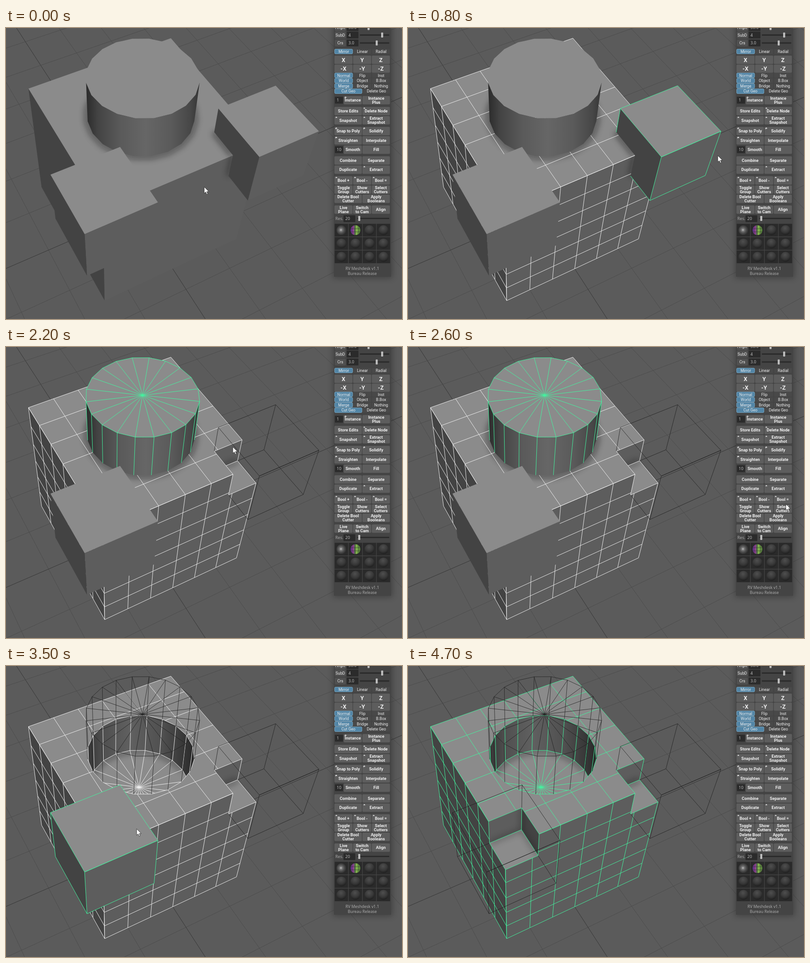
Recreate the animation shown at these times as an HTML page. Size 873x641 px, loop 5000 ms.

```html
<!DOCTYPE html>
<html lang="en">
<head>
<meta charset="utf-8">
<title>Boolean modelling</title>
<style>
html, body { margin: 0; width: 100%; height: 100%; overflow: hidden; background: #5b5b5b; }
svg { display: block; width: 873px; height: 641px; }
text { font-family: Roboto, Arial, sans-serif; }
.plain { font-family: "Noto Sans", "Open Sans", sans-serif; }
</style>
</head>
<body>
<svg viewBox="0 0 873 641">
  <defs>
    <linearGradient id="outside" gradientUnits="userSpaceOnUse" x1="177" x2="428" y1="0" y2="0">
      <stop offset="0" stop-color="#2b2b2b"/><stop offset=".1" stop-color="#434343"/>
      <stop offset=".3" stop-color="#5a5a5a"/><stop offset=".52" stop-color="#666"/>
      <stop offset=".75" stop-color="#5a5a5a"/><stop offset=".92" stop-color="#464646"/><stop offset="1" stop-color="#333"/>
    </linearGradient>
    <linearGradient id="inside" gradientUnits="userSpaceOnUse" x1="180" x2="415" y1="0" y2="0">
      <stop offset="0" stop-color="#363636"/><stop offset=".15" stop-color="#505050"/>
      <stop offset=".4" stop-color="#606060"/><stop offset=".7" stop-color="#505050"/>
      <stop offset=".88" stop-color="#3a3a3a"/><stop offset="1" stop-color="#292929"/>
    </linearGradient>
    <radialGradient id="ball" cx=".45" cy=".3" r=".7">
      <stop offset="0" stop-color="#4f4f4f"/><stop offset=".6" stop-color="#383838"/><stop offset="1" stop-color="#1f1f1f"/>
    </radialGradient>
    <radialGradient id="shiny" cx=".45" cy=".48" r=".55">
      <stop offset="0" stop-color="#c4c4c4"/><stop offset=".25" stop-color="#7a7a7a"/>
      <stop offset=".55" stop-color="#525252"/><stop offset="1" stop-color="#2c2c2c"/>
    </radialGradient>
    <linearGradient id="rainbow">
      <stop offset="0" stop-color="#4b2f80"/><stop offset=".28" stop-color="#a83fa8"/>
      <stop offset=".4" stop-color="#4a5a50"/><stop offset=".55" stop-color="#86b84e"/><stop offset="1" stop-color="#55853a"/>
    </linearGradient>
    <filter id="soft" filterUnits="userSpaceOnUse" x="0" y="0" width="873" height="641"><feGaussianBlur stdDeviation="7"/></filter>
  </defs>
  <rect width="873" height="641" fill="#5b5b5b"/>
  <g id="ground"></g>
  <g id="scene"></g>
  <g id="panel"></g>
  <path id="cursor" d="M0 0V14.2L3.3 11.2L5.6 16.4L7.9 15.4L5.7 10.4H10.2Z" fill="#fff" stroke="#222" stroke-width=".8"/>
</svg>
<script>
const $ = id => document.getElementById(id);
const GREEN = '#43f5a0', WHITE = '#f2f2f2', BLACK = '#202020';
const TOP = '#8b8b8b', FRONT = '#5d5d5d', LEFT = '#434343';

// Perspective view of a unit cube: x to the right, y to the back, z down.
function project([x, y, z]) {
  const w = 1 + .0821 * x + .164 * y + .217 * z;
  return [(213.5 + 395.3 * x - 156.5 * y + 50.6 * z) / w + .5,
          (401.6 - 127.4 * x - 246.8 * y + 328.6 * z) / w + .5].map(v => v.toFixed(1)).join(' ');
}
const line = pts => 'M' + pts.map(project).join('L');
const loop = pts => line(pts) + 'Z';
const fill = (d, color) => `<path d="${d}" fill="${color}"/>`;
const stroke = (d, color, width = .95) => color
  ? `<path d="${d}" fill="none" stroke="${color}" stroke-width="${width}" stroke-linejoin="round"/>` : '';
const clipped = (id, d, body) => `<clipPath id="${id}"><path d="${d}"/></clipPath><g clip-path="url(#${id})">${body}</g>`;
const shade = (d, width, opacity) => `<path d="${d}" fill="none" stroke="#111" stroke-width="${width}" opacity="${opacity}" filter="url(#soft)"/>`;

const range = (a, b) => Array.from({ length: b - a + 1 }, (_, i) => a + i);

// Cutter boxes; the extra fields say where edges disappear into the cube.
const rightBox = { x0: .8086, x1: 1.193, y0: -.1935, y1: .1907, z0: -.198, z1: .188,
  leftDrop: 0, leftRun: 0, farDrop: .188, farRun: .1907, back: [1, 1.193] };
const frontBox = { x0: -.197, x1: .202, y0: -.2, y1: .197, z0: -.195, z1: .202,
  leftDrop: .202, leftRun: .197, farDrop: 0, farRun: 0, back: [-.197, 0] };

const boxTop = b => loop([[b.x0, b.y0, b.z0], [b.x1, b.y0, b.z0], [b.x1, b.y1, b.z0], [b.x0, b.y1, b.z0]]);
const boxFront = b => loop([[b.x0, b.y0, b.z0], [b.x1, b.y0, b.z0], [b.x1, b.y0, b.z1], [b.x0, b.y0, b.z1]]);
const boxLeft = b => loop([[b.x0, b.y0, b.z0], [b.x0, b.y1, b.z0], [b.x0, b.y1, b.leftDrop],
  [b.x0, b.leftRun, b.leftDrop], [b.x0, b.leftRun, b.z1], [b.x0, b.y0, b.z1]]);

const seenEdges = b => boxTop(b) + boxFront(b) +
  line([[b.x0, b.y1, b.z0], [b.x0, b.y1, b.leftDrop]]) +
  line([[b.x0, b.y0, b.z1], [b.x0, b.leftRun, b.z1]]);
const hiddenEdges = b =>
  line([[b.x1, b.y1, b.z0], [b.x1, b.y1, b.farDrop]]) +
  line([[b.x1, b.y0, b.z1], [b.x1, b.farRun, b.z1]]) +
  line(b.back.map(x => [x, b.y1, b.z1]));

const solidBox = (b, wire) =>
  fill(boxFront(b), FRONT) + fill(boxLeft(b), LEFT) + fill(boxTop(b), TOP) + stroke(seenEdges(b), wire);
const ghostBox = b => stroke(seenEdges(b) + hiddenEdges(b), BLACK, .8);

// Cylinder with twenty sides
const DEPTH = .313;
const rim = (i, z) => [.5 + .313 * Math.cos(i * Math.PI / 10), .5 + .313 * Math.sin(i * Math.PI / 10), z];
const ring = z => loop(range(0, 19).map(i => rim(i, z)));
const fan = z => range(0, 19).map(i => line([[.5, .5, z], rim(i, z)])).join('');
const ribs = (from, to, z0, z1) => range(from, to).map(i => line([rim(i, z0), rim(i, z1)])).join('');

function solidCylinder(wire) {
  const side = loop([...range(9, 18).map(i => rim(i, -DEPTH)), ...range(9, 18).reverse().map(i => rim(i, 0))]);
  return fill(side, 'url(#outside)') + fill(ring(-DEPTH), TOP) +
    stroke(ring(-DEPTH) + fan(-DEPTH) + ribs(9, 18, -DEPTH, 0), wire);
}
const ghostCylinder = () => stroke(ring(-DEPTH) + fan(-DEPTH) + ribs(0, 19, -DEPTH, 0), BLACK, .8);

function hole(wire) {
  const floor = ring(DEPTH);
  const body = `<rect x="170" y="100" width="260" height="190" fill="url(#inside)"/>` + fill(floor, TOP) +
    clipped('floor', floor, shade(line(range(0, 10).map(i => rim(i, DEPTH))), 14, .32)) +
    stroke(floor + fan(DEPTH) + ribs(0, 19, 0, DEPTH), wire);
  return clipped('rim', ring(0), body) + stroke(ring(0), wire);
}

// One cube side: outline in its own two axes, six by six grid
function face(id, outline, color, wire, shadow = '') {
  const place = { left: ([y, z]) => [0, y, z], front: ([x, z]) => [x, 0, z], top: ([x, y]) => [x, y, 0] }[id];
  const edge = loop(outline.map(place));
  const grid = range(1, 5).map(k => line([place([k / 6, 0]), place([k / 6, 1])]) + line([place([0, k / 6]), place([1, k / 6])])).join('');
  return { edge, body: fill(edge, color) + clipped(id, edge, shadow + stroke(grid, wire)) };
}

function rightNotch(wire) {
  const { x0, y1, z1 } = rightBox;
  const floor = loop([[x0, 0, z1], [1, 0, z1], [1, y1, z1], [x0, y1, z1]]);
  const wall = loop([[x0, y1, 0], [1, y1, 0], [1, y1, z1], [x0, y1, z1]]);
  const seam = line([[x0, y1, z1], [1, y1, z1]]);
  return fill(floor, TOP) + fill(wall, FRONT) + clipped('nook', floor + wall, shade(seam, 12, .3)) +
    stroke(seam + line([[1, y1, 0], [1, y1, z1], [1, 0, z1]]), wire);
}

function frontNotch(wire) {
  const { x1, y1, z1 } = frontBox;
  const floor = loop([[0, 0, z1], [x1, 0, z1], [x1, y1, z1], [0, y1, z1]]);
  const back = loop([[0, y1, 0], [x1, y1, 0], [x1, y1, z1], [0, y1, z1]]);
  const side = loop([[x1, 0, 0], [x1, y1, 0], [x1, y1, z1], [x1, 0, z1]]);
  const corner = line([[0, y1, z1], [x1, y1, z1], [x1, 0, z1]]) + line([[x1, y1, 0], [x1, y1, z1]]);
  return fill(floor, TOP) + fill(back, FRONT) + fill(side, LEFT) +
    clipped('step', floor + back + side, shade(corner, 8, .28)) + stroke(corner, wire);
}

function drawScene({ cuts, cube, picked }) {
  const r = rightBox, f = frontBox;
  const cutRight = cuts > 0, cutHole = cuts > 1, cutFront = cuts > 2;
  const nearEdge = (a, b) => cutFront ? [[0, b], [a, b], [a, 0]] : [[0, 0]];
  const farEdge = b => cutRight ? [[r.x0, 0], [r.x0, b], [1, b]] : [[1, 0]];
  const shadow = (cutHole ? '' : shade(ring(0), 14, .42)) +
    (cutRight ? '' : shade(line([[r.x0, r.y1, 0], [r.x0, 0, 0]]), 12, .5));
  const frontShadow = cutRight ? '' : shade(line([[r.x0, 0, 0], [r.x0, 0, r.z1]]), 10, .4);
  const faces = [
    face('left', [...nearEdge(f.y1, f.z1), [1, 0], [1, 1], [0, 1]], LEFT, cube),
    face('front', [...nearEdge(f.x1, f.z1), ...farEdge(r.z1), [1, 1], [0, 1]], FRONT, cube, frontShadow),
    face('top', [...nearEdge(f.x1, f.y1), ...farEdge(r.y1), [1, 1], [0, 1]], TOP, cube, shadow)
  ];
  return [
    cutRight ? rightNotch(cube) : '',
    ...faces.map(side => side.body),
    cutFront ? frontNotch(cube) : '',
    stroke(faces.map(side => side.edge).join(''), cube),
    cutHole ? hole(cube) + ghostCylinder() : solidCylinder(picked === 'cylinder' && GREEN),
    cutRight ? ghostBox(r) : solidBox(r, picked === 'right' && GREEN),
    cutFront ? ghostBox(f) : solidBox(f, picked === 'front' && GREEN)
  ].join('');
}

function drawGround() {
  const at = k => .5 + k / 3, lo = at(-9), hi = at(30);
  return range(-9, 30).map(k => {
    const d = line([[at(k), lo, 1], [at(k), hi, 1]]) + line([[lo, at(k), 1], [hi, at(k), 1]]);
    return stroke(d, k ? '#4b4b4b' : '#363636', k ? .9 : 1);
  }).join('');
}

function drawPanel() {
  let out = `<rect x="721" y="-10" width="131" height="561" fill="#000" opacity=".27" filter="url(#soft)"/>
    <rect x="723" y="-5" width="126" height="553" fill="#444"/>`;
  const rect = (x, y, w, h, color, extra = '') => out += `<rect x="${x}" y="${y}" width="${w}" height="${h}" fill="${color}" ${extra}/>`;
  const text = (s, x, y, size, color = '#eee', extra = 'text-anchor="middle"') =>
    out += `<text x="${x}" y="${y}" font-size="${size}" fill="${color}" ${extra}>${s}</text>`;
  const bold = 'text-anchor="middle" font-weight="700"';
  const plain = 'class="plain"', plainMiddle = 'class="plain" text-anchor="middle"';

  // A label may start with ^ (corner caret) or ~ (corner caret with a letter) and use | for a second line.
  function button(label, x, cy, w, h = 18.5, size = 9.2) {
    const mark = /^[\^~]/.test(label) ? label[0] : '';
    const rows = label.slice(mark.length).split('|');
    rect(x, cy - h / 2, w, h, '#5d5d5d', 'rx="2"');
    if (mark) out += `<path d="M${x + 2} ${cy - 5.5}l2.3 -2.5l2.3 2.5z" fill="#eee"/>`;
    if (mark === '~') text('s', x + 3, cy - 4, 6);
    rows.forEach((row, i) => text(row, x + w / 2, cy + size * .36 + (i - (rows.length - 1) / 2) * 8.4, size, '#f0f0f0', bold));
  }
  function row(labels, cy, h, size) {
    const w = 123.5 / labels.length;
    labels.forEach((label, i) => button(label, 724 + i * w, cy, w - 1.2, h, size));
  }
  function tabs(labels, cy) {
    const w = 123.5 / labels.length;
    labels.forEach((label, i) => {
      const on = i === 0;
      rect(724.5 + i * w, cy - 5.2, w - 1.5, 10.4, on ? '#5285a6' : '#494949', `rx="2" ${on ? 'stroke="#86b4d0" stroke-width=".8"' : ''}`);
      text(label, 724 + (i + .5) * w, cy + 3.2, 8.7);
    });
  }
  function field(value, x, cy, w) {
    rect(x, cy - 7.5, w, 15, '#2b2b2b', 'rx="1"');
    text(value, x + 4, cy + 3.4, 9, '#bbb', plain);
  }
  function slider(x, cy, knob) {
    rect(x, cy - 1.5, 845 - x, 3, '#2b2b2b', 'rx="1"');
    rect(knob - 2, cy - 5.5, 4.5, 11, '#bdbdbd', 'rx="1"');
  }

  [['Angle', '30.0', -1, 799], ['SubD', '4', 15.5, 829], ['Crs', '3.0', 33, 817]].forEach(([name, value, y, knob]) => {
    rect(725, y - 7.5, 24, 15, '#505050', 'rx="2"');
    text(name, 737, y + 3.4, 8.8);
    field(value, 751, y, 26);
    slider(780, y, knob);
  });
  tabs(['Mirror', 'Linear', 'Radial'], 51.7);
  row(['X', 'Y', 'Z'], 70, 18.5, 12.5);
  row(['-X', '-Y', '-Z'], 89.5, 18, 12.5);
  tabs(['Normal', 'Flip', 'Inst'], 104.3);
  tabs(['World', 'Object', 'B.Box'], 116);
  tabs(['Merge', 'Bridge', 'Nothing'], 127.6);
  tabs(['Cut Geo', 'Delete Geo'], 139.2);

  field('1', 725, 159, 18);
  button('~Instance', 744.5, 159, 40);
  button('Instance|Plus', 785.8, 159, 60.7);
  row(['Store Edits', '^Delete Node'], 183);
  row(['^Snapshot', '^Extract|Snapshot'], 203.3);
  row(['~Snap to Poly', '~Solidify'], 227);
  row(['~Straighten', 'Interpolate'], 247.4);
  field('10', 725, 268, 18);
  button('Smooth', 744.5, 268, 40);
  button('Fill', 785.8, 268, 60.7);
  row(['Combine', 'Separate'], 291.7);
  row(['Duplicate', '^Extract'], 312);
  row(['^Bool +', '^Bool -', '^Bool ='], 335.7);
  row(['Toggle|Group', 'Show|Cutters', 'Select|Cutters'], 356);
  row(['Delete Bool|Cutter', 'Apply|Booleans'], 376.3);
  row(['Live|Plane', 'Switch|to Cam', 'Align'], 400);
  text('Res.', 726, 423.2, 9, '#aaa', plain);
  field('20', 744, 420, 26);
  slider(774, 419.5, 778.5);

  range(0, 11).forEach(i => {
    const x = 739.5 + i % 4 * 30.9, y = 445.3 + Math.floor(i / 4) * 29.4;
    rect(x - 15, y - 14, 29.6, 28, '#2a2a2a');
    out += `<circle cx="${x}" cy="${y}" r="10.8" fill="url(#${['shiny', 'rainbow'][i] || 'ball'})"/>`;
  });
  out += stroke('M770.4 434.5v21.6M760 442h20.6M760 449h20.6M776 436.5q3 9 0 17.5M765 436.5q-3 9 0 17.5', '#333', .7);
  text('RV Meshdesk v1.1', 785.5, 533.3, 8.8, '#adadad', plainMiddle);
  text('Bureau Release', 785.5, 544.3, 8.8, '#adadad', plainMiddle);
  return out;
}

const states = [
  { from: 0, cuts: 0 },
  { from: 100, cuts: 0, cube: GREEN },
  { from: 700, cuts: 0, cube: WHITE, picked: 'right' },
  { from: 1300, cuts: 1, cube: GREEN },
  { from: 1900, cuts: 1, cube: WHITE, picked: 'cylinder' },
  { from: 2800, cuts: 2, cube: GREEN },
  { from: 3500, cuts: 2, cube: WHITE, picked: 'front' },
  { from: 4300, cuts: 3, cube: GREEN }
];

// Pointer stops: time, x, y
const stops = [
  [0, 437, 350], [200, 434, 352], [300, 440, 342], [600, 576, 236], [800, 683, 281], [1000, 824, 334],
  [1300, 788, 336], [1500, 648, 314], [1800, 400, 210], [2000, 335, 150], [2200, 500, 220], [2400, 770, 322],
  [2600, 833, 346], [2800, 786, 337], [3000, 519, 326], [3300, 320, 350], [3600, 272, 363], [3800, 480, 340],
  [4000, 804, 312], [4100, 793, 316], [4300, 788, 337], [4400, 720, 400], [4600, 560, 603], [5000, 560, 603]
];

function pointerAt(t) {
  const i = stops.findIndex(s => s[0] > t);
  const [t0, x0, y0] = stops[i - 1], [t1, x1, y1] = stops[i];
  const k = (t - t0) / (t1 - t0);
  return [x0 + (x1 - x0) * k, y0 + (y1 - y0) * k];
}

$('ground').innerHTML = drawGround();
$('panel').innerHTML = drawPanel();

let shown;
function render(time) {
  const t = Math.min(Math.floor(time % 5000 / 100) * 100, 4700);
  const state = states.filter(s => s.from <= t).pop();
  if (state !== shown) $('scene').innerHTML = drawScene(shown = state);
  $('cursor').setAttribute('transform', `translate(${pointerAt(t)})`);
  $('cursor').setAttribute('visibility', t < 4700 ? 'visible' : 'hidden');
}

const start = performance.now();
function tick() {
  render(performance.now() - start);
  requestAnimationFrame(tick);
}
tick();
</script>
</body>
</html>
```
